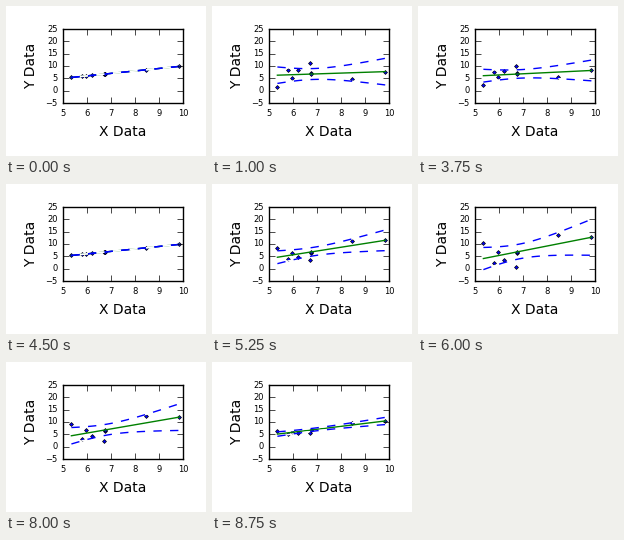
Write a matplotlib script that moves like this. It is 200 px wide and 150 px high and loops after 9 s.

```python
import numpy as np
import matplotlib.pyplot as plt
from matplotlib.animation import FuncAnimation

plt.style.use("classic")

W, H, DPI = 200, 150, 100
FRAMES, INTERVAL = 36, 250
T_95 = 2.365  # two-sided 95 % t quantile, 7 degrees of freedom

x = np.array([5.35, 5.81, 5.94, 6.19, 6.69, 6.73, 6.77, 8.44, 9.85])
noise = np.array([-5.75, 3.9, -1.05, 3.2, 6.75, 0.55, 0.2, -5.95, -3.3])
grid = np.linspace(x.min(), x.max(), 100)


def fit(y):
    """Least-squares line and half width of its confidence band."""
    dx = x - x.mean()
    sxx = np.sum(dx**2)
    slope = np.sum(dx * y) / sxx
    resid = y - y.mean() - slope * dx
    s = np.sqrt(np.sum(resid**2) / (len(x) - 2))
    dg = grid - x.mean()
    half = T_95 * s * np.sqrt(1 / len(x) + dg**2 / sxx)
    return y.mean() + slope * dg, half


fig = plt.figure(figsize=(W / DPI, H / DPI), dpi=DPI, facecolor="white")
ax = fig.add_axes([57 / W, 53 / H, 120 / W, 74 / H])
ax.set(xlim=(5, 10), ylim=(-5, 25), xticks=range(5, 11), yticks=range(-5, 26, 5))
ax.tick_params(labelsize=6)
ax.set_xlabel("X Data", fontsize=10)
ax.set_ylabel("Y Data", fontsize=10)

points, = ax.plot(x, x, "bD", markersize=2)
line, = ax.plot(grid, grid, "g-")
upper, = ax.plot(grid, grid, "b--", gapcolor="white")
lower, = ax.plot(grid, grid, "b--", gapcolor="white")


def update(i):
    y = x + noise * np.sin(2 * np.pi * i / FRAMES)
    mid, half = fit(y)
    points.set_ydata(y)
    line.set_ydata(mid)
    upper.set_ydata(mid + half)
    lower.set_ydata(mid - half)
    return points, line, upper, lower


anim = FuncAnimation(fig, update, frames=FRAMES, interval=INTERVAL,
                     repeat=True, repeat_delay=0)
plt.show()
```
